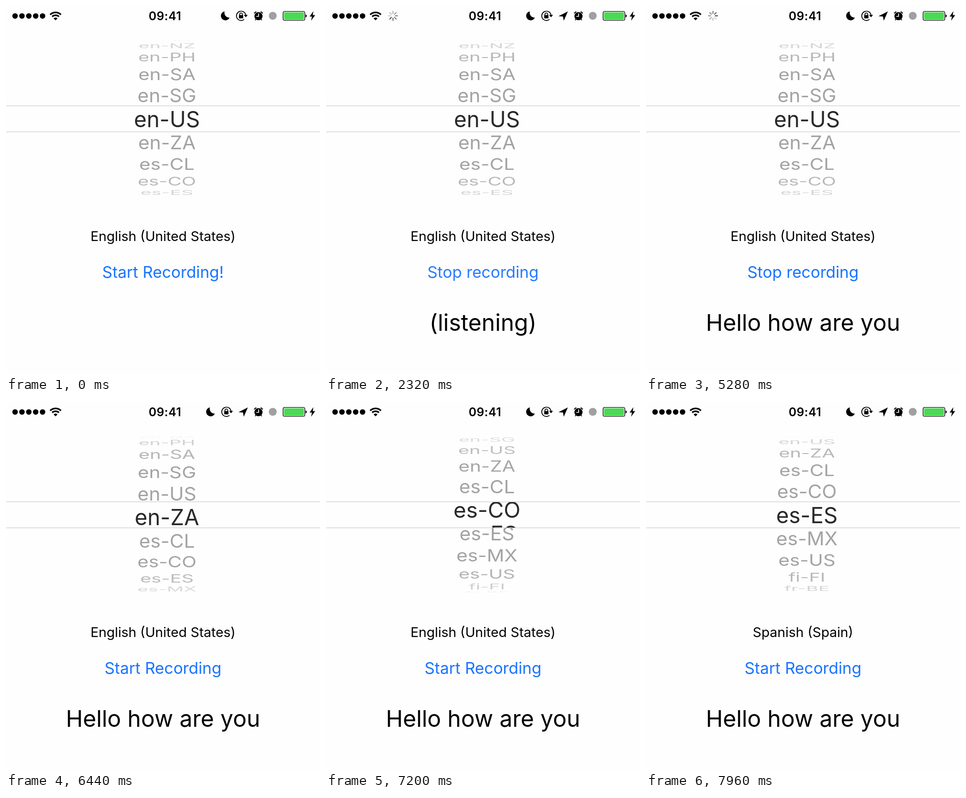
Write an HTML page that moves like this. It is 640 px wide and 750 px high and loops after 8000 ms.

```html
<!DOCTYPE html>
<html lang="en">
<head>
<meta charset="utf-8">
<title>Speech recognition demo</title>
<style>
  html, body { margin: 0; width: 100%; height: 100%; overflow: hidden; background: #fefefe; }
  svg { display: block; width: 640px; height: 750px; }
  text { font-family: Inter, Roboto, sans-serif; font-optical-sizing: none; text-anchor: middle; }
  .line { fill: none; stroke: #000; }
  #clock { font-size: 24px; font-weight: 600; letter-spacing: .5px; }
  #rows { font-size: 39.8px; fill: #a3a3a4; }
  #lens { font-size: 44.6px; fill: #29292b; }
  #language { font-size: 27.5px; }
  #button { font-size: 32.5px; fill: #1a73ff; }
  #result { font-size: 46.7px; }
</style>
</head>
<body>
<svg viewBox="0 0 640 750">
  <defs>
    <clipPath id="outside"><path d="M0 66H640V203H0ZM0 257H640V388H0Z"/></clipPath>
    <clipPath id="inside"><path d="M0 204H640V256H0Z"/></clipPath>
  </defs>

  <g id="signal"></g>
  <g id="wifi">
    <path class="line" stroke-width="3.3" d="M90 17.6A15.6 15.6 0 0 1 112 17.6M94.1 21.7A9.8 9.8 0 0 1 107.9 21.7"/>
    <path d="M101 29.3L97 25.2A5.7 5.7 0 0 1 105 25.2Z"/>
  </g>
  <g id="spinner"></g>
  <text id="clock" x="324" y="29">09:41</text>

  <g id="modes">
    <path d="M445.5 11A9.2 9.2 0 1 0 455.7 23.6A10 10 0 0 1 445.5 11Z"/>
    <path class="line" stroke-width="1.7" d="M485.5 27.2A9.5 9.5 0 1 1 488.6 18.5"/>
    <path d="M484.8 18H492.6L488.7 23Z"/>
    <rect x="474.8" y="18.5" width="8.6" height="6.8" rx="1"/>
    <path class="line" stroke-width="1.6" d="M476.3 19V17A2.8 2.8 0 0 1 481.9 17V19"/>
  </g>
  <path id="location" d="M474 20.8L493 11L484.6 30L483 21.6Z"/>
  <g id="alarm">
    <circle cx="514.6" cy="20.8" r="8.3"/>
    <path class="line" stroke-width="2" stroke-linecap="round" d="M506.4 14.6L509.4 11.9M522.8 14.6L519.8 11.9"/>
    <path class="line" stroke-width="1.6" d="M509.6 26.5L507.8 29M519.6 26.5L521.4 29"/>
    <path class="line" style="stroke:#fff" stroke-width="1.6" d="M514.8 15V21.2H510.2"/>
  </g>
  <circle cx="543.7" cy="20" r="8" fill="#a0a0a2"/>
  <g id="battery">
    <rect class="line" x="564.7" y="11.2" width="44.4" height="18" rx="3.2" stroke-width="1.3"/>
    <rect x="566.5" y="13" width="40.8" height="14.4" rx="1.6" fill="#4cd953"/>
    <path d="M610.5 17A3.4 3.4 0 0 1 610.5 23.6Z"/>
    <path d="M626.6 10.6L618.8 21.4H623.6L621.8 30L630.2 18.6H625.2Z"/>
  </g>

  <g clip-path="url(#outside)"><g id="rows"></g></g>
  <g clip-path="url(#inside)"><g id="lens"></g></g>
  <path d="M0 203.5H640M0 256.5H640" stroke="#c6c6c8"/>

  <text id="language" x="320" y="479"></text>
  <text id="button" x="320" y="554"></text>
  <text id="result" x="320" y="662"></text>
</svg>

<script>
const LOOP = 8000, STEP = 40;
const LOCALES = ['en-IN', 'en-NZ', 'en-PH', 'en-SA', 'en-SG', 'en-US', 'en-ZA', 'es-CL', 'es-CO',
  'es-ES', 'es-MX', 'es-US', 'fi-FI', 'fr-BE', 'fr-CA'];
const FIRST = LOCALES.indexOf('en-US');
const WHEEL = { x: 328, y: 230.3, radius: 159.3, angle: 17.5 * Math.PI / 180 };
const PETALS = 8;

// Each cue holds from its time until the next one.
const CUES = {
  language: [[0, 'English (United States)'], [7840, 'Spanish (Spain)']],
  button: [[0, 'Start Recording!'], [1840, 'Stop recording'], [5520, 'Start Recording']],
  result: [[0, ''], [1840, '(listening)'], [3880, 'Hello'], [4520, 'Hello how'],
    [4760, 'Hello how are'], [5000, 'Hello how are you']]
};
const TAPS = [{ down: 1440, up: 1840, end: 2360 }, { down: 5280, up: 5520, end: 6040 }];
const LOCATION_ON = 2000, SPINNER_ON = 2080, SPINNER_OFF = 5560;

const $ = id => document.getElementById(id);
const clamp = v => Math.max(0, Math.min(1, v));

function add(parent, tag, attrs, text = '') {
  const el = document.createElementNS('http://www.w3.org/2000/svg', tag);
  for (const name in attrs) el.setAttribute(name, attrs[name]);
  el.textContent = text;
  return parent.appendChild(el);
}

for (let i = 0; i < 5; i++) add($('signal'), 'circle', { cx: 18.5 + 14 * i, cy: 20.3, r: 5.6 });

const petals = Array.from({ length: PETALS }, (_, i) => add($('spinner'), 'path', {
  d: 'M0 -4.6V-9.4', stroke: '#333', 'stroke-width': 1.8, 'stroke-linecap': 'round',
  transform: `translate(136.5 20) rotate(${i * 360 / PETALS})`
}));

// The baseline is set so that the capitals are centred on the row.
const makeRows = id => LOCALES.map(name => add($(id), 'text', { dy: '.364em' }, name));
const rows = makeRows('rows');
const lens = makeRows('lens');

function cueAt(list, t) {
  return list.filter(([start]) => start <= t).pop()[1];
}

function buttonOpacity(t) {
  const tap = TAPS.find(({ down, end }) => t >= down && t < end);
  if (!tap) return 1;
  return t < tap.up
    ? 1 - 0.8 * clamp((t - tap.down) / 80)
    : 0.2 + 0.8 * (t - tap.up) / (tap.end - tap.up);
}

// A short drag, then the wheel coasts to rest four rows further on.
function wheelPosition(t) {
  if (t < 6440) return 0.9 * clamp((t - 6280) / 160);
  return 4 - 3.1 * (1 - clamp((t - 6440) / 1374)) ** 1.7;
}

function placeRow(el, distance, faded) {
  const angle = distance * WHEEL.angle;
  const visible = Math.abs(angle) < Math.PI / 2;
  el.style.display = visible ? '' : 'none';
  if (!visible) return;
  const cos = Math.cos(angle);
  const scale = 1 - 0.06 * (1 - cos);
  const y = WHEEL.y + WHEEL.radius * Math.sin(angle);
  el.setAttribute('transform', `translate(${WHEEL.x} ${y}) scale(${scale} ${cos})`);
  if (faded) el.setAttribute('opacity', Math.min(1, 0.06 + 1.15 * cos));
}

function render(t) {
  for (const id in CUES) {
    const text = cueAt(CUES[id], t);
    if ($(id).textContent !== text) $(id).textContent = text;
  }
  $('button').setAttribute('opacity', buttonOpacity(t));

  const located = t >= LOCATION_ON;
  $('location').style.display = located ? '' : 'none';
  $('modes').setAttribute('transform', `translate(${located ? -30 : 0} 0)`);

  $('spinner').style.display = t >= SPINNER_ON && t < SPINNER_OFF ? '' : 'none';
  const head = Math.floor(t / 80);
  petals.forEach((petal, i) => {
    const age = (head - i + PETALS) % PETALS;
    petal.setAttribute('opacity', 0.9 - 0.65 * age / (PETALS - 1));
  });

  const position = wheelPosition(t);
  LOCALES.forEach((_, i) => {
    const distance = i - FIRST - position;
    placeRow(rows[i], distance, true);
    placeRow(lens[i], distance, false);
  });
}

const start = performance.now();
function frame() {
  const t = (performance.now() - start) % LOOP;
  render(Math.floor(t / STEP) * STEP);
  requestAnimationFrame(frame);
}
frame();
</script>
</body>
</html>
```
